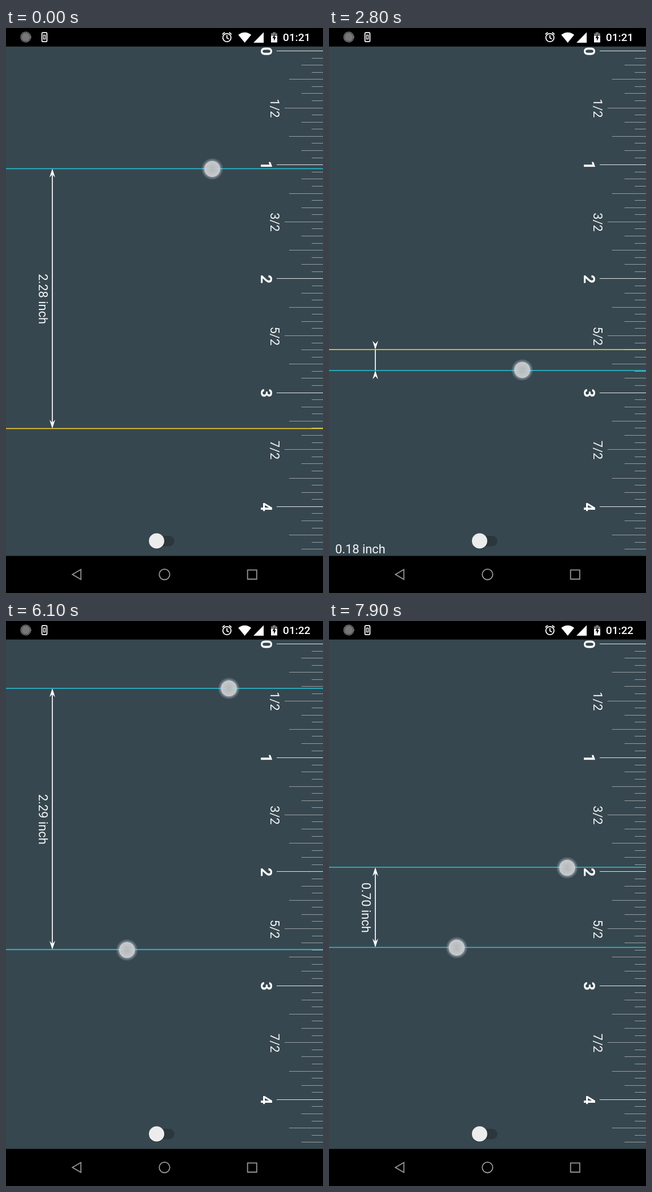
Write an HTML page that moves like this. It is 561x998 px and loops after 8000 ms.

```html
<!DOCTYPE html>
<html lang="en">
<head>
<meta charset="utf-8">
<title>Screen ruler</title>
<style>
  html, body { margin: 0; width: 100%; height: 100%; overflow: hidden; background: #000; }
  svg { display: block; width: 561px; height: 998px; }
  text { font: 21.84px Roboto, sans-serif; fill: #f4f6f7; }
  .whole { font-size: 27.3px; font-weight: 700; fill: #fff; }
  #clock { font-size: 19.2px; font-weight: 500; fill: #fff; }
  .outline { fill: none; stroke: #fff; stroke-width: 1.8; }
  .nav { fill: none; stroke: #999; stroke-width: 1.8; }
</style>
</head>
<body>
<svg viewBox="0 0 561 998">
  <defs>
    <radialGradient id="glow">
      <stop offset="0" stop-color="#bcbfc1" stop-opacity=".93"/>
      <stop offset=".7" stop-color="#d2d4d6" stop-opacity=".93"/>
      <stop offset=".74" stop-color="#dfe4f0" stop-opacity=".42"/>
      <stop offset="1" stop-color="#dfe4f0" stop-opacity="0"/>
    </radialGradient>
    <path id="head" d="M0 0 5 15.5 0 10-5 15.5Z" fill="#fff"/>
    <circle id="finger" r="19.5" fill="url(#glow)"/>
  </defs>
  <rect width="561" height="998" fill="#37474f"/>

  <g id="ruler" text-anchor="middle"></g>

  <path id="shaft" stroke="#fff" stroke-width="1.7"/>
  <use id="headTop" href="#head"/>
  <use id="headBottom" href="#head"/>
  <path id="lineA" stroke-width="1.6"/>
  <path id="lineB" stroke-width="1.6"/>
  <text id="label"></text>

  <rect x="255" y="897" width="43" height="18.5" rx="9.2" fill="#2b373d"/>
  <circle cx="266.8" cy="907" r="14" fill="#000" opacity=".2"/>
  <circle cx="266.5" cy="906" r="13.6" fill="#ececec"/>

  <use id="fingerA" href="#finger"/>
  <use id="fingerB" href="#finger"/>

  <!-- status bar -->
  <path d="M0 0H561V32.7H0Z"/>
  <circle cx="35" cy="16" r="7.5" fill="#777"/>
  <circle cx="35" cy="16" r="8.6" fill="none" stroke="#aaa" stroke-width="1.8" stroke-dasharray="1.6 1"/>
  <rect class="outline" x="63.6" y="8.2" width="8.8" height="16" rx="1.5"/>
  <path class="outline" d="M66.5 12.5H69.5V19.5H66.5Z" style="stroke-width:1.3"/>
  <circle class="outline" cx="391" cy="17" r="7.2"/>
  <path class="outline" d="M391 12.5V17.4L394.4 19.5M382.8 11.4 387 7.8M399.2 11.4 395 7.8"/>
  <path d="M422.5 26 411 12Q422.5 3.5 434 12ZM438 26 456 7.5V26Z" fill="#fff"/>
  <path d="M469 14V9.5H472V7.5H477V9.5H480V14Z" fill="#777"/>
  <path d="M469 14H480V25.5H469Z" fill="#fff"/>
  <path d="M475.5 11 471.5 18H474V23L477.8 16.3H475.5Z"/>
  <text id="clock" x="490" y="23"></text>

  <!-- navigation bar -->
  <path d="M0 932.6H561V998H0Z"/>
  <path class="nav" d="M117.5 965.2 132.5 956.5V974Z"/>
  <circle class="nav" cx="280.5" cy="965.2" r="9.3"/>
  <path class="nav" d="M427.5 957.3H443.7V973.5H427.5Z"/>
</svg>
<script>
const INCH = 201.2, ZERO = 40.5, LOOP = 8000, STEP = 100;
const ACTIVE = '#26c6da', IDLE = '#fdd835';
const $ = id => document.getElementById(id);
const set = (id, attrs) => {
  for (const name in attrs) $(id).setAttribute(name, attrs[name]);
};

// Ruler, in sixteenths of an inch
let marks = '';
for (let i = 0; i <= 70; i++) {
  const y = ZERO + i * INCH / 16;
  const x = i % 16 == 0 ? 479 : i % 8 == 0 ? 493 : i % 4 == 0 ? 501 : i % 2 == 0 ? 523 : 541;
  marks += `<path d="M${x} ${y}H561" stroke="#fff" shape-rendering="crispEdges" opacity="${i % 16 ? .48 : .88}"/>`;
  if (i % 16 == 0)
    marks += `<text class="whole" transform="translate(451 ${y + .7}) rotate(90)">${i / 16}</text>`;
  else if (i % 8 == 0 && i < 64)
    marks += `<text transform="translate(468 ${y + .7}) rotate(90)">${i / 8}/2</text>`;
}
$('ruler').innerHTML = marks;

// Rows: time, finger x, finger y, line y
const trackA = [
  [0, 365, 249, 248.5], [1000, 398, 554, 550.5], [1500, 400, 570, 568],
  [6000, 214, 568, 568], [6700, 218, 838, 829], [6800, 219, 847, 840],
  [7700, 225, 591, 590], [7900, 226, 577, 576.5]
];
const trackB = [
  [1900, 336, 707, 707.5], [2800, 342, 604, 605], [3500, 351.5, 557, 555.5],
  [4200, 345, 556, 555.5], [4500, 341.5, 518.5, 522.5], [5000, 385, 222, 228],
  [5300, 395.5, 137, 140.5], [5600, 395, 119, 119], [6800, 394, 119.5, 119],
  [7700, 418, 413, 411], [7900, 421.5, 436, 435]
];

// Monotone cubic interpolation of one column
function sample(rows, col, t) {
  const last = rows.length - 1;
  if (t <= rows[0][0]) return rows[0][col];
  if (t >= rows[last][0]) return rows[last][col];
  const slope = i => (rows[i + 1][col] - rows[i][col]) / (rows[i + 1][0] - rows[i][0]);
  const tangent = i => {
    if (i == 0 || i == last) return 0;
    const a = slope(i - 1), b = slope(i);
    return a * b > 0 ? 2 * a * b / (a + b) : 0;
  };
  const i = rows.findIndex(row => row[0] > t) - 1;
  const span = rows[i + 1][0] - rows[i][0], u = (t - rows[i][0]) / span;
  const ease = u * u * (3 - 2 * u);
  return rows[i][col] + (rows[i + 1][col] - rows[i][col]) * ease
    + span * u * (1 - u) * (tangent(i) * (1 - u) - tangent(i + 1) * u);
}

function drawHandle(name, rows, t, active, touched) {
  const y = sample(rows, 3, t);
  set('line' + name, { d: `M0 ${y}H561`, stroke: active ? ACTIVE : IDLE });
  set('finger' + name, {
    x: sample(rows, 1, t), y: sample(rows, 2, t), visibility: touched ? 'visible' : 'hidden'
  });
  return y;
}

function draw(t) {
  const a = drawHandle('A', trackA, t, t < 1900 || t >= 6000, t < 1600 || t >= 6000);
  const b = drawHandle('B', trackB, t, t >= 1900, t >= 1900 && t < 3700 || t >= 4200);
  const top = Math.min(a, b), bottom = Math.max(a, b), gap = bottom - top;
  const roomy = gap > 110;

  set('shaft', { d: `M82 ${top + (roomy ? 8 : 0)}V${bottom - (roomy ? 8 : 0)}` });
  set('headTop', { transform: `translate(82 ${top}) scale(1 ${roomy ? 1 : -1})` });
  set('headBottom', { transform: `translate(82 ${bottom}) scale(1 ${roomy ? -1 : 1})` });
  set('label', roomy
    ? { transform: `translate(57.5 ${(top + bottom) / 2 + .7}) rotate(90)`, 'text-anchor': 'middle' }
    : { transform: 'translate(11 928)', 'text-anchor': 'start' });
  $('label').textContent = (gap / INCH).toFixed(2) + ' inch';
  $('clock').textContent = t < 4800 ? '01:21' : '01:22';
}

function tick() {
  draw(Math.floor(performance.now() % LOOP / STEP) * STEP);
  requestAnimationFrame(tick);
}
tick();
</script>
</body>
</html>
```
